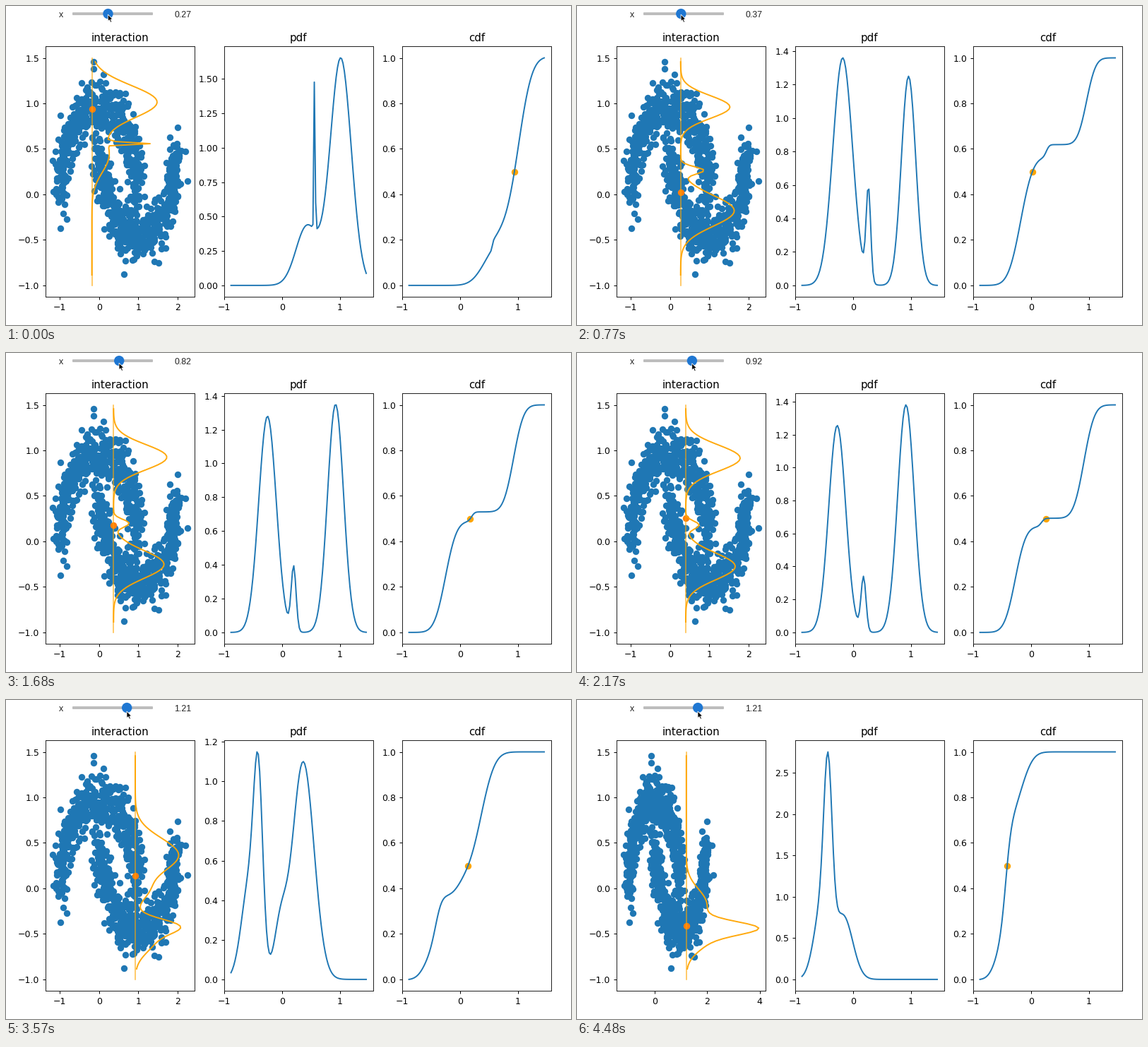
Recreate the animation shown at these times as a matplotlib script. Size 800x452 px, loop 4550 ms.

```python
import numpy as np
import matplotlib.pyplot as plt
from matplotlib.animation import FuncAnimation
from matplotlib.patches import Circle, FancyBboxPatch, Polygon

W, H, DPI = 800, 452, 64
FRAMES, INTERVAL = 65, 70
K = 90 / DPI          # chart sizes follow a 90 dpi layout
PX = 72 / DPI         # points per pixel

plt.rcParams.update({
    "font.family": "DejaVu Sans",
    "font.size": 10 * K,
    "axes.titlesize": 12 * K,
    "axes.titlepad": 6 * K,
    "axes.linewidth": 0.8 * K,
    "axes.edgecolor": "#222222",
    "lines.linewidth": 1.55 * K,
})
for axis in ("xtick", "ytick"):
    plt.rcParams.update({f"{axis}.major.size": 3.5 * K,
                         f"{axis}.major.pad": 3.5 * K,
                         f"{axis}.major.width": 0.8 * K})

# The plot trails the slider: frames where it refreshes, and the x it shows.
REFRESH = [0, 5, 17, 29, 42, 54, 63]
SHOWN_X = [-0.18, 0.27, 0.37, 0.40, 0.92, 0.95, 1.21]

# Mixture of bumps (height, centre, width) at key x; linear in between.
NONE = (0, 0, 0.1)
MIXTURE = {
    -0.18: [(0.43, 0.43, 0.19), (1.18, 0.562, 0.01), (1.65, 1.015, 0.182), NONE],
    0.27: [(1.36, -0.18, 0.17), (0.55, 0.265, 0.039), (1.25, 0.96, 0.1245), NONE],
    0.40: [(1.255, -0.275, 0.147), (0.33, 0.18, 0.043), (1.38, 0.915, 0.143), NONE],
    0.92: [(0.5, -0.56, 0.14), (0.85, -0.412, 0.078), (1.1, 0.365, 0.187),
           (0.25, -0.03, 0.11)],
    1.21: [(0.92, -0.53, 0.14), (1.84, -0.435, 0.07), (0.75, -0.165, 0.16), NONE],
}

# Slider drags: first frame, last frame, from, to.
DRAGS = [(1, 3, 0.27, 0.37), (17, 29, 0.37, 0.92), (41, 47, 0.92, 1.21)]

GRID = np.linspace(-0.885, 1.456, 100)
X_MIN, X_MAX = -1.177, 2.25
EXTREMES = [(-0.13, 1.455), (-0.13, 1.38), (-0.97, -0.37), (0.63, -0.88),
            (1.99, 0.735), (2.24, 0.15), (-1.17, 0.37)]


def moons(n=1000):
    """Two noisy half circles that hold the extreme points too."""
    rng = np.random.RandomState(4)
    t = np.linspace(0, np.pi, n // 2)
    arc = np.column_stack([np.cos(t), np.sin(t)])
    radius = rng.normal(0.96, 0.08, (n, 1))
    pts = radius * np.vstack([arc, -arc])
    pts[n // 2:] += (1, 0.5)
    pts += rng.normal(size=(n, 2)) * (0.05, 0.12)
    x, y = pts.T
    keep = (x > X_MIN) & (x < 2.2) & (y > -0.8) & (y < 1.32)
    keep &= (y < 0.7) | (x < 1.5)
    return np.vstack([pts[keep], EXTREMES])


def density(x):
    keys = list(MIXTURE)
    table = np.array(list(MIXTURE.values())).reshape(len(keys), -1)
    bumps = np.array([np.interp(x, keys, col) for col in table.T]).reshape(-1, 3)
    return sum(h * np.exp(-0.5 * ((GRID - m) / s) ** 2) for h, m, s in bumps)


def cumulative(p):
    c = np.concatenate([[0], np.cumsum((p[1:] + p[:-1]) / 2)])
    return c / c[-1]


def padded(lo, hi):
    pad = 0.05 * (hi - lo)
    return lo - pad, hi + pad


def slider_value(frame):
    value = DRAGS[0][2]
    for start, end, a, b in DRAGS:
        u = np.clip((frame - start) / (end - start), 0, 1)
        value += (b - a) * (1 - (1 - u) ** 2)
    return value


fig = plt.figure(figsize=(W / DPI, H / DPI), dpi=DPI, facecolor="white")


def panel(left, title):
    ax = fig.add_axes([left / W, 1 - 412 / H, 210.6 / W, 354.6 / H])
    ax.set_title(title)
    return ax


ax_data = panel(56.3, "interaction")
ax_pdf = panel(309, "pdf")
ax_cdf = panel(561, "cdf")
dot = dict(s=36 * K ** 2, linewidths=1.5 * K)

# Interaction panel
ax_data.scatter(*moons().T, color="tab:blue", **dot)
data_dot = ax_data.scatter([0], [0], color="tab:orange", **dot)
rule, = ax_data.plot([0, 0], [-1, 1.5], color="orange", alpha=0.7, lw=1.3 * K)
profile, = ax_data.plot(GRID, GRID, color="orange", alpha=0.95)
ax_data.set_ylim(padded(-1, 1.5))

# Density panels
pdf_line, = ax_pdf.plot(GRID, GRID, color="tab:blue")
cdf_dot = ax_cdf.scatter([0], [0.5], color="orange", **dot)
cdf_line, = ax_cdf.plot(GRID, GRID, color="tab:blue")
ax_cdf.set_ylim(padded(0, 1))
for ax in (ax_pdf, ax_cdf):
    ax.set_xlim(padded(GRID[0], GRID[-1]))

# Slider, in pixel coordinates
ui = fig.add_axes([0, 0, 1, 1])
ui.set(xlim=(0, W), ylim=(H, 0))
ui.axis("off")
ui.add_patch(FancyBboxPatch((95, 10), 112, 2, boxstyle="round,pad=1",
                            fc="#bdbdbd", ec="none"))
knob = ui.add_patch(Circle((145, 11), 7.2, fc="#1f77d2", ec="none", zorder=3))
label = dict(family="Liberation Sans", fontsize=12.4 * PX, color="#222222",
             va="baseline")
ui.text(74.5, 15.5, "x", **label)
readout = ui.text(238.5, 15.5, "", **label)
ARROW = np.array([(0, 0), (0, 9.6), (2.2, 7.6), (3.8, 11.2),
                  (5.5, 10.4), (3.9, 7), (6.9, 6.8)])
pointer = ui.add_patch(Polygon(ARROW, fc="black", ec="white", lw=0.8 * PX, zorder=4))


def show_plot(x):
    p = density(x)
    c = cumulative(p)
    median = np.interp(0.5, c, GRID)
    rule.set_xdata([x, x])
    profile.set_data(x + p, GRID)
    data_dot.set_offsets([(x, median)])
    ax_data.set_xlim(padded(X_MIN, max(X_MAX, x + p.max())))
    pdf_line.set_ydata(p)
    ax_pdf.set_ylim(padded(0, p.max()))
    cdf_line.set_ydata(c)
    cdf_dot.set_offsets([(median, 0.5)])


def show_slider(value):
    knob_x = 94.2 + (value + 1.5) * 28.4
    knob.center = (knob_x, 11)
    readout.set_text(f"{value:.2f}")
    tip_y = np.interp(value, [0.37, 1.21], [12, 16])
    pointer.set_xy(ARROW + (knob_x - 0.2, tip_y))


def update(frame):
    show_plot(SHOWN_X[np.searchsorted(REFRESH, frame, side="right") - 1])
    show_slider(slider_value(frame))
    return []


anim = FuncAnimation(fig, update, frames=FRAMES, interval=INTERVAL,
                     repeat=True, repeat_delay=0, blit=False)
plt.show()
```
